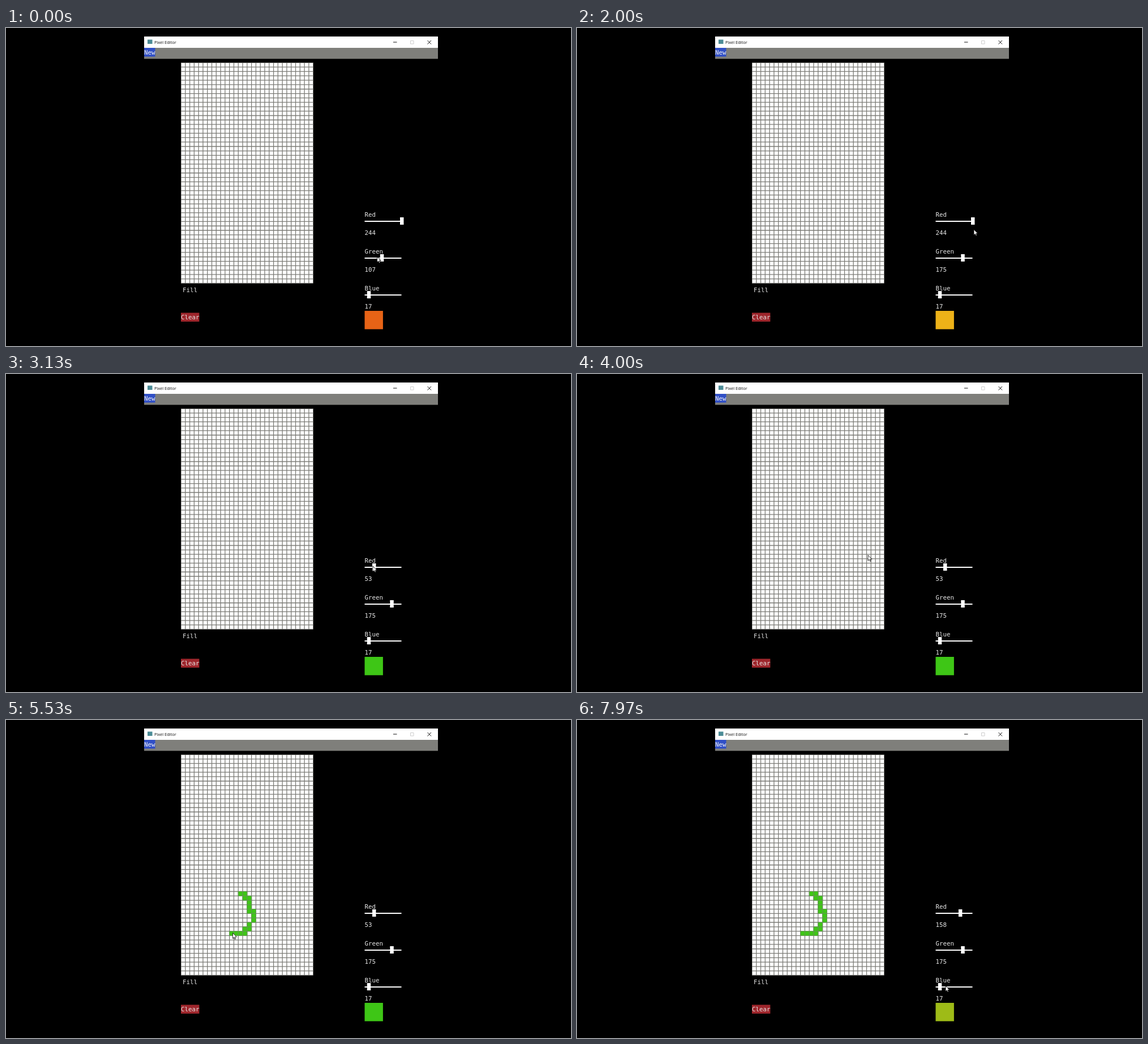
An HTML page with a canvas for the animation above (8000 ms loop, 998 by 561 pixels).

```html
<!DOCTYPE html>
<html lang="en">
<head>
<meta charset="utf-8">
<title>Pixel Editor</title>
<style>
  html, body { margin: 0; width: 100%; height: 100%; overflow: hidden; background: #000; }
  canvas { display: block; }
</style>
</head>
<body>
<canvas id="stage" width="998" height="561"></canvas>
<script>
const ctx = document.getElementById('stage').getContext('2d');
const LOOP = 8000;
const MONO = '10.8px "DejaVu Sans Mono", monospace';
const GRID = { x: 309, y: 61, cols: 30, rows: 50, size: 7.79 };
const STROKE = { start: 4500, end: 5450 };
const SLIDER_X = 633.5, SLIDER_Y = 341, SLIDER_GAP = 65;

const ease = p => p * p * (3 - 2 * p);
const clamp = p => Math.min(1, Math.max(0, p));

// Keys are [time, values]; neighbours are joined by an eased move
function sample(keys, t) {
  const i = keys.findIndex(([time]) => time > t);
  if (i < 0) return keys[keys.length - 1][1];
  const [t0, from] = keys[i - 1], [t1, to] = keys[i];
  const p = ease((t - t0) / (t1 - t0));
  return from.map((v, n) => v + (to[n] - v) * p);
}

// Hand-drawn arc in cell units, a cubic curve for p from 0 to 1
function arc(p) {
  const q = 1 - p;
  const bezier = (a, b, c, d) => a * q ** 3 + 3 * b * q * q * p + 3 * c * q * p * p + d * p ** 3;
  return [bezier(13.3, 16.15, 18.55, 11.75), bezier(31.3, 31.6, 41.6, 40.4)];
}

function arcPoint(p) {
  const [col, row] = arc(p);
  return [GRID.x + col * GRID.size, GRID.y + row * GRID.size];
}

const handleX = value => SLIDER_X - 0.1 + 0.2565 * value;
const grip = (channel, value) => [handleX(value) + 1, SLIDER_Y - 2 + SLIDER_GAP * channel];

const colorKeys = [
  [0, [244, 107, 17]], [1000, [244, 107, 17]], [1600, [244, 175, 17]],
  [2300, [244, 175, 17]], [2950, [53, 175, 17]], [7080, [53, 175, 17]], [7600, [158, 175, 17]]
];
const cursorKeys = [
  [0, [655.5, 403.5]], [370, grip(1, 107)], [1000, grip(1, 107)], [1600, grip(1, 175)],
  [2000, [701, 355.5]], [2300, grip(0, 244)], [2950, grip(0, 53)], [3400, grip(0, 53)],
  [STROKE.start, arcPoint(0)], [STROKE.end, arcPoint(1)], [5870, arcPoint(1)],
  [6700, grip(0, 53)], [7080, grip(0, 53)], [7600, grip(0, 158)], [7950, [651, 469]]
];

// Colours as a screen recording shows them (BT.709 read as BT.601)
function recorded(r, g, b) {
  const y = 0.2126 * r + 0.7152 * g + 0.0722 * b;
  const dr = r - y, db = b - y;
  return `rgb(${[y + 0.8903 * dr, y - 0.4535 * dr - 0.1855 * db, y + 0.955 * db].map(Math.round)})`;
}

function rect(x, y, w, h, color) {
  ctx.fillStyle = color;
  ctx.fillRect(x, y, w, h);
}

function text(s, x, y, color = '#e8e8e8', font = MONO) {
  ctx.font = font;
  ctx.fillStyle = color;
  ctx.fillText(s, x, y);
}

function outline(path, color, width) {
  ctx.strokeStyle = color;
  ctx.lineWidth = width;
  ctx.stroke(new Path2D(path));
}

function drawWindow() {
  rect(244, 15, 519, 20, '#fff');
  rect(250, 20.5, 8.5, 7.5, '#4b8b96');
  text('Pixel Editor', 262, 27.5, '#111', '7.45px "Open Sans", sans-serif');
  outline('M684 25h6.5M744.5 22l6.5 6.5m0-6.5l-6.5 6.5', '#111', 1);
  outline('M714.5 22.5h5.5v5.5h-5.5z', '#ccc', 1);
  rect(244, 35, 519, 19.4, '#7f7f7b');
  rect(244, 35, 19.5, 15.5, '#304fc6');
  text('New', 244, 47, '#f4f4f4');
  text('Fill', 312, 466);
  rect(309, 502.4, 32.4, 15.6, '#9e262c');
  text('Clear', 309, 514);
}

function drawGrid(t) {
  const { x, y, cols, rows, size } = GRID;
  const w = cols * size, h = rows * size;
  ctx.save();
  ctx.beginPath();
  ctx.rect(x, y, w, h);
  ctx.clip();
  rect(x, y, w, h, '#fff');
  let seams = '';
  for (let c = 0; c <= cols; c++) seams += `M${x + c * size} ${y}v${h}`;
  for (let r = 0; r <= rows; r++) seams += `M${x} ${y + r * size}h${w}`;
  outline(seams, '#7b7b76', 1.3);
  drawPaint(t);
  ctx.restore();
}

// Every cell the arc has crossed so far is filled
function drawPaint(t) {
  if (t < STROKE.start) return;
  const done = ease(clamp((t - STROKE.start) / (STROKE.end - STROKE.start)));
  const cells = new Set();
  for (let p = 0; p <= done; p += 0.005) cells.add(arc(p).map(Math.floor).join());
  const { x, y, size } = GRID;
  for (const cell of cells) {
    const [col, row] = cell.split(',');
    const cx = x + col * size, cy = y + row * size;
    rect(cx, cy, size, size, recorded(53, 175, 17));
    outline(`M${cx} ${cy}h${size}v${size}h${-size}z`, '#5f9a4c', 1.2);
  }
}

function drawSlider(label, value, y) {
  text(label, SLIDER_X, y - 8);
  rect(SLIDER_X, y - 1, 65, 2, '#fff');
  rect(handleX(value), y - 7, 6.5, 13, '#fff');
  text(Math.round(value), SLIDER_X, y + 24);
}

function drawCursor([x, y]) {
  const arrow = new Path2D('M0 0v9.8l2.3-2.1 1.4 3.3 1.6-.7-1.4-3.2 3-.1z');
  ctx.save();
  ctx.translate(x, y);
  ctx.fillStyle = '#fff';
  ctx.fill(arrow);
  outline(arrow, '#000', 0.8);
  ctx.restore();
}

function draw(t) {
  const color = sample(colorKeys, t);
  rect(0, 0, 998, 561, '#000');
  drawWindow();
  drawGrid(t);
  ['Red', 'Green', 'Blue'].forEach((name, i) => drawSlider(name, color[i], SLIDER_Y + SLIDER_GAP * i));
  rect(SLIDER_X, 499, 32.4, 32.4, recorded(...color));
  drawCursor(sample(cursorKeys, t));
}

const start = performance.now();
function frame() {
  draw((performance.now() - start) % LOOP);
  requestAnimationFrame(frame);
}
frame();
</script>
</body>
</html>
```
